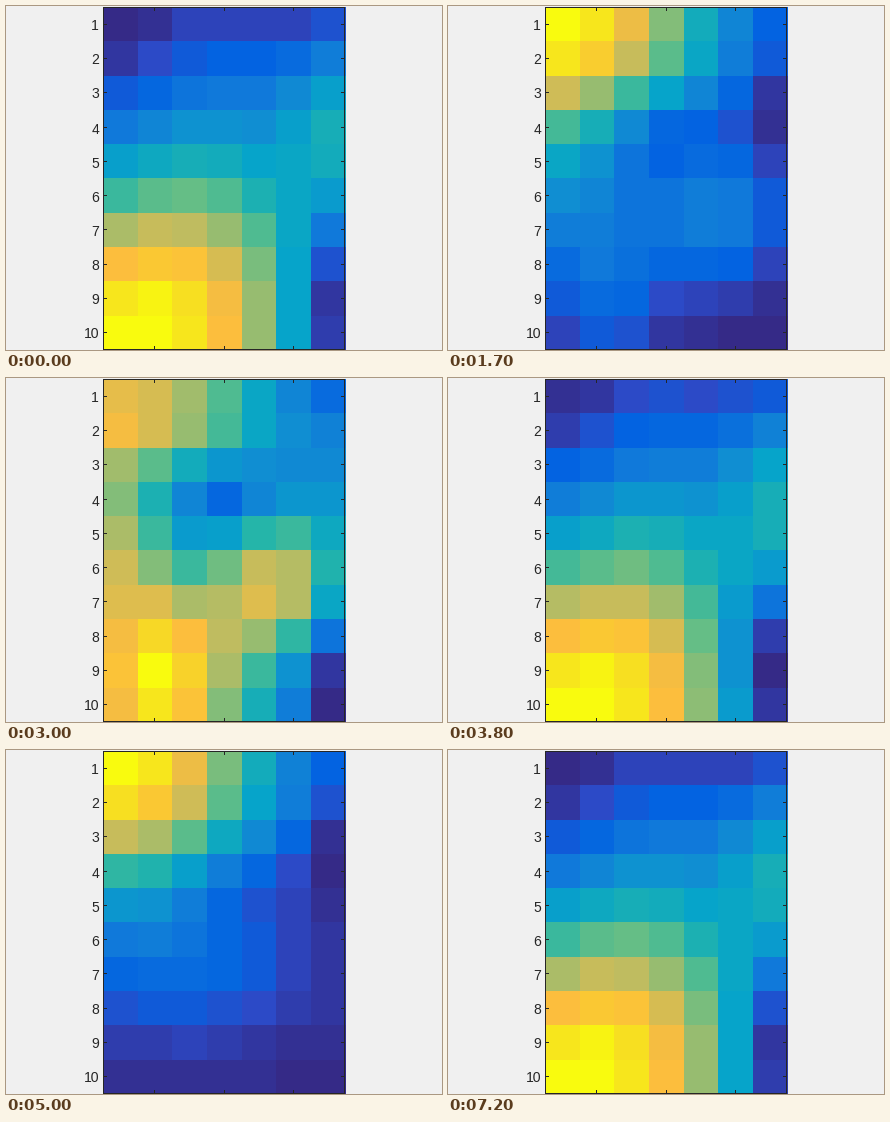
A matplotlib script for the animation above (7300 ms loop, 436 px wide and 344 px high).

```python
import math

import numpy as np
import matplotlib.pyplot as plt
from matplotlib.animation import FuncAnimation
from matplotlib.colors import LinearSegmentedColormap

W, H, DPI = 436, 344, 100
FRAMES, INTERVAL = 73, 100
TURN = 36  # steps in one full cycle of the field
ROWS, COLS = 10, 7
LEFT, RIGHT, TOP, BOTTOM = 97, 339, 1, 344
INK = "#262626"
PX = 72 / DPI
TICK = 4

# Colours at levels of a 0 to 63 scale
STOPS = {
    0: "#352a87", 5: "#2c4ac7", 8: "#0363e1", 13: "#1079da", 18: "#108ed2",
    23: "#06a4ca", 30: "#25b5a9", 36: "#65be86", 45: "#c0bc60",
    53: "#fdbe3d", 58: "#f7d826", 63: "#f9fb0e",
}
CMAP = LinearSegmentedColormap.from_list(
    "blue_yellow", [(level / 63, color) for level, color in STOPS.items()], N=64)

row, col = np.mgrid[:ROWS, :COLS]


def bump(r, c, tall, wide, height):
    """Gaussian hill centred on row r and column c."""
    return height * np.exp(-((row - r) / tall) ** 2 / 2
                           - ((col - c) / wide) ** 2 / 2)


low = (bump(9, 0.5, 3.5, 3.8, 63)         # large hill, bottom left
       + bump(3.5, 3, 3.5, 1.6, 10)       # faint central column
       + bump(3, 6.2, 2, 1.1, 23)         # right shoulder
       + bump(8.3, 6.2, 1.8, 0.9, -18))   # dark bottom-right corner

low_dimmed = low + bump(7.5, 5.2, 1.5, 1, -5)

wide_top = (bump(1, 0.9, 2.25, 3.4, 63)
            + bump(5.5, 0.3, 1.4, 1.2, 28)
            + bump(9.3, 1.3, 0.9, 1.3, 20)
            + bump(7.8, 3.6, 1, 0.8, 17)
            + bump(5.5, 6.3, 2.2, 0.6, 9)
            + bump(0, 6, 1.2, 1.2, -17))

corner = (bump(0, 0, 2.5, 3, 63)
          + bump(6, 2, 1.6, 2.5, 8)
          + bump(3.3, 3, 1, 1.2, -6)
          + bump(2.5, 6.2, 1, 0.8, -5))

split = (bump(0.3, 0, 1.4, 3.3, 63)
         + bump(4, -0.2, 1.8, 1, 36)
         + bump(8, 1.2, 1.8, 1.2, 30)
         + bump(5.5, 4.6, 1.4, 1.3, 42)
         + bump(3, 2.9, 0.7, 0.7, -11))

PHASES = [0, 2, 10, 14, 25, TURN]
POSES = [low, low_dimmed, wide_top, corner, split, low]


def field(step):
    """Blend neighbouring poses and stretch the result to the full scale."""
    phase = step % TURN
    i = np.searchsorted(PHASES, phase, side="right") - 1
    t = (phase - PHASES[i]) / (PHASES[i + 1] - PHASES[i])
    values = (1 - t) * POSES[i] + t * POSES[i + 1]
    return (values - values.min()) / np.ptp(values)


fig = plt.figure(figsize=(W / DPI, H / DPI), dpi=DPI, facecolor="#f0f0f0")
ax = fig.add_axes([0, 0, 1, 1])
ax.axis("off")
image = ax.imshow(field(0), cmap=CMAP, vmin=0, vmax=1, aspect="auto",
                  interpolation="nearest", extent=(LEFT, RIGHT, BOTTOM, TOP))
ax.set_xlim(0, W)
ax.set_ylim(H, 0)


def line(x0, y0, x1, y1):
    ax.plot([x0, x1], [y0, y1], color=INK, lw=PX, snap=False,
            solid_capstyle="butt")


def cell_center(start, end, count, i):
    """Middle of cell i, moved to the centre of its pixel."""
    return math.floor(start + (i + 0.5) * (end - start) / count) + 0.5


for y in (TOP + 0.5, BOTTOM - 0.5):
    line(LEFT, y, RIGHT, y)
for x in (LEFT + 0.5, RIGHT - 0.5):
    line(x, TOP, x, BOTTOM)

for i in range(ROWS):
    y = cell_center(TOP, BOTTOM, ROWS, i)
    line(LEFT, y, LEFT + TICK, y)
    line(RIGHT - TICK, y, RIGHT, y)
    ax.text(93, y + 2, str(i + 1), ha="right", va="center", color=INK,
            family="Liberation Sans", size=14 * PX)

for i in range(1, COLS, 2):
    x = cell_center(LEFT, RIGHT, COLS, i)
    line(x, TOP, x, TOP + TICK)
    line(x, BOTTOM - TICK, x, BOTTOM)


def update(step):
    image.set_data(field(step))
    return [image]


anim = FuncAnimation(fig, update, frames=FRAMES, interval=INTERVAL,
                     repeat=True, repeat_delay=0)
plt.show()
```
